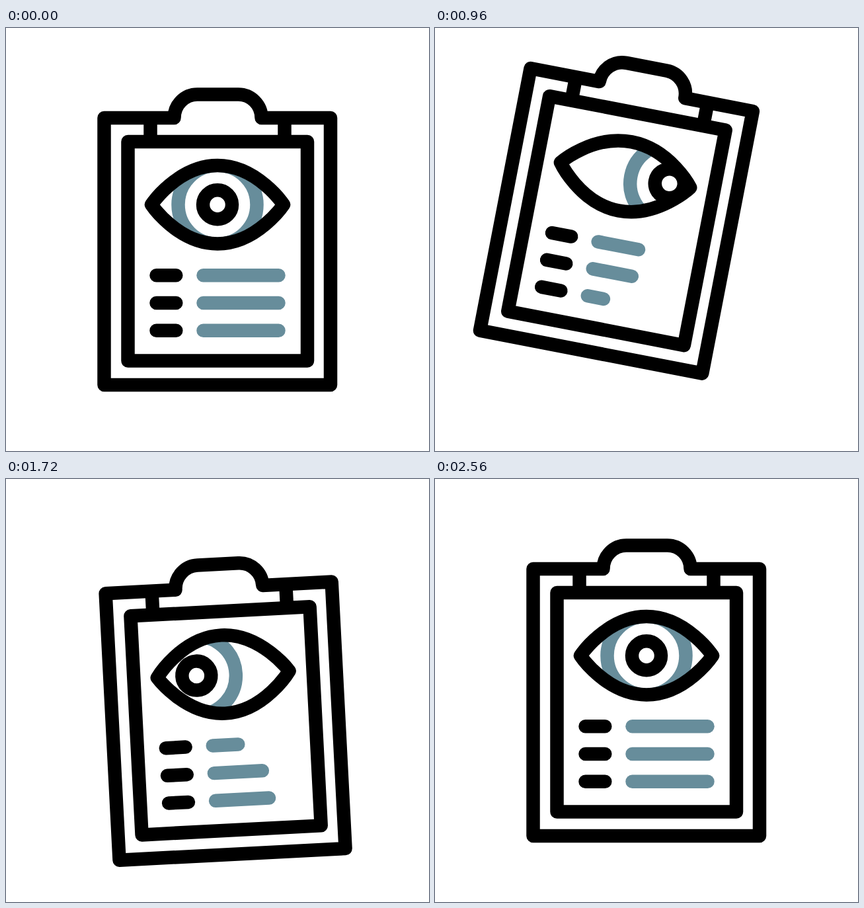
An HTML page that plays this animation: 640 by 640 pixels, repeating every 2.6 s.

```html
<!DOCTYPE html>
<html lang="en">
<head>
<meta charset="utf-8">
<title>Eye chart clipboard</title>
<style>
html, body { margin: 0; width: 100%; height: 100%; overflow: hidden; background: #fff; }
svg { display: block; width: 100vw; height: 100vh; }
</style>
</head>
<body>
<svg viewBox="0 0 640 640" fill="none" stroke="#000" stroke-width="20.5" stroke-linecap="round" stroke-linejoin="round">
  <clipPath id="lids"><path id="hole"/></clipPath>
  <g id="board">
    <path d="M254.5 136H148.5V540H491V136H386.5A35 35.5 0 0 0 351.5 100.5H289.5A35 35.5 0 0 0 254.5 136Z"/>
    <path d="M218.5 136V172M421.5 136V172" stroke-linecap="butt"/>
    <rect x="184.5" y="172" width="271.5" height="331.5"/>
    <g clip-path="url(#lids)">
      <g id="iris">
        <circle cx="320" cy="267.3" r="59.5" stroke="#678d9b"/>
        <circle cx="320" cy="267.3" r="22"/>
      </g>
    </g>
    <path id="almond"/>
    <path d="M227.5 374.3H257.3M227.5 416H257.3M227.5 457.7H257.3"/>
    <g id="rows" stroke="#678d9b"><path/><path/><path/></g>
  </g>
</svg>
<script>
const LOOP = 2600;
const PIVOT = { x: 320, y: 99 };
const $ = id => document.getElementById(id);
const rows = [...$('rows').children];

// keys: [time, value] pairs, eased in and out between neighbours
function track(keys, t) {
  if (t <= keys[0][0]) return keys[0][1];
  for (let i = 1; i < keys.length; i++) {
    const [t0, a] = keys[i - 1], [t1, b] = keys[i];
    if (t < t1) {
      const k = (t - t0) / (t1 - t0);
      return a + (b - a) * k * k * (3 - 2 * k);
    }
  }
  return keys[keys.length - 1][1];
}

const tilt = [[0, 0], [368, -13.3], [921, 11.3], [1474, -13.3], [2027, 11.3], [2408, 0]];
const lift = [[0, 0], [600, 49.7], [1020, -47], [1640, 30], [2225, 0]];
const gaze = [[210, 0], [580, 68], [956, 68], [1326, -63.5], [1570, -63.5], [1940, 0]];
const blink = [[590, 0], [807, 1], [1000, 0]];
const full = 114;
const shortRows = [34, 55, 24.5];

function rowLength(i, t) {
  const d = i * 82, s = shortRows[i];
  return track([[210 + d, full], [580 + d, s], [812 + d, s], [1182 + d, full],
    [1405 + d, full], [1775 + d, s], [2008 + d, s], [2378 + d, full]], t);
}

function eyePath(up, low) {
  const y = 267.3;
  return `M220 ${y}C220 ${y} 260 ${y + up} 320 ${y + up}S420 ${y} 420 ${y}` +
    `C420 ${y} 380 ${y + low} 320 ${y + low}S220 ${y} 220 ${y}Z`;
}

function draw(t) {
  $('board').setAttribute('transform',
    `translate(0 ${track(lift, t)}) rotate(${track(tilt, t)} ${PIVOT.x} ${PIVOT.y})`);
  const shut = track(blink, t);
  const d = eyePath(-59.2 + 77.5 * shut, 59.2 - 40.5 * shut);
  $('hole').setAttribute('d', d);
  $('almond').setAttribute('d', d);
  $('iris').setAttribute('transform', `translate(${track(gaze, t)} 0)`);
  rows.forEach((row, i) =>
    row.setAttribute('d', `M298.5 ${374.3 + i * 41.7}h${rowLength(i, t)}`));
}

const start = performance.now();
function tick() {
  draw((performance.now() - start) % LOOP);
  requestAnimationFrame(tick);
}
draw(0);
requestAnimationFrame(tick);
</script>
</body>
</html>
```
